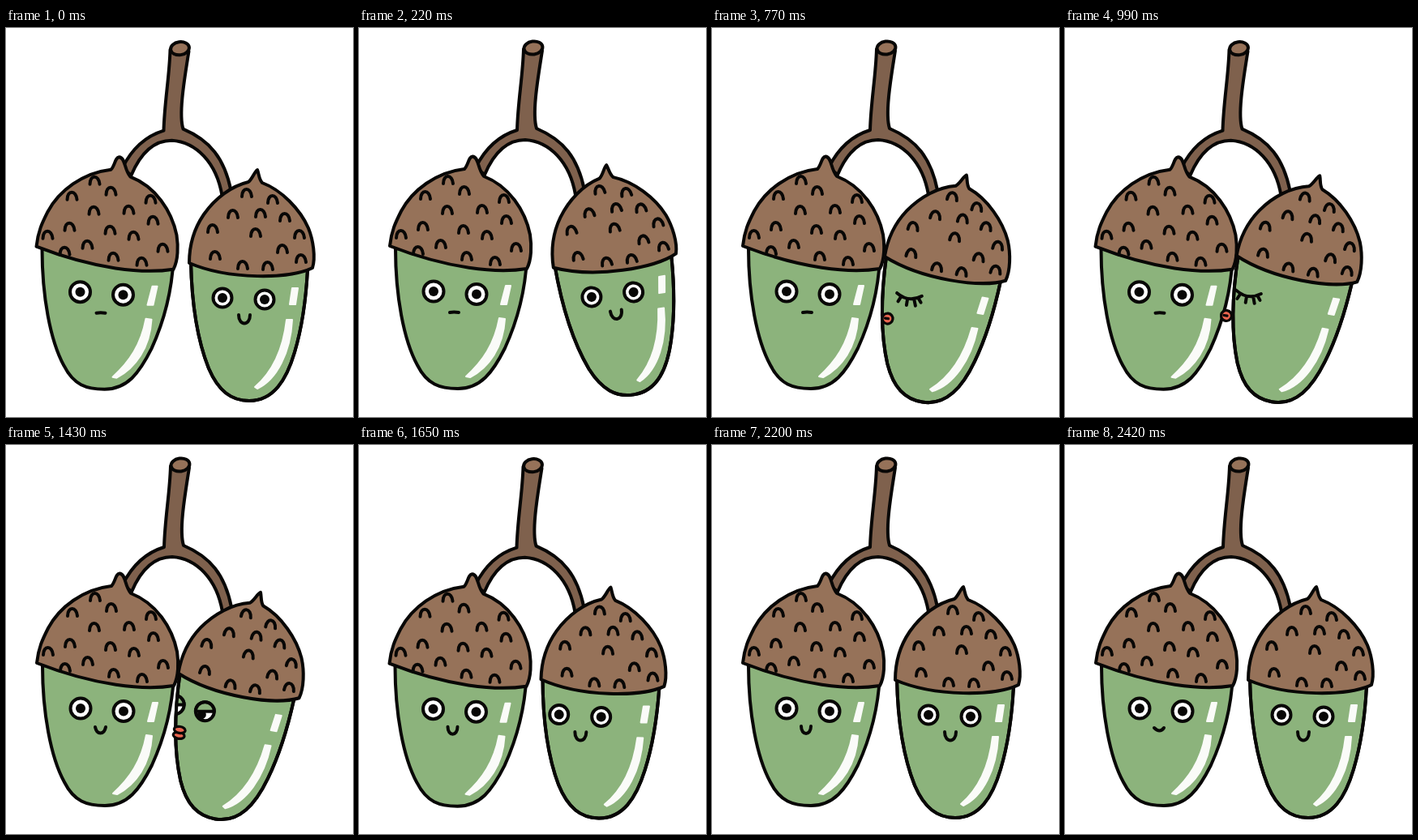
Write an HTML page that moves like this. It is 428x480 px and loops after 2530 ms.

```html
<!DOCTYPE html>
<html lang="en">
<head>
<meta charset="utf-8">
<title>Acorns</title>
<style>
  html, body { margin: 0; width: 100%; height: 100%; overflow: hidden; background: #fff; }
  svg { display: block; width: 100%; height: 100%; }
  .ink { stroke: #080706; stroke-width: 4; stroke-linecap: round; stroke-linejoin: round; }
  .line { fill: none; }
  .cap { fill: #967259; }
  .body { fill: #8cb37c; }
  .branch { fill: #7f614d; }
  .shine { fill: #fafbf8; stroke: #fafbf8; stroke-width: 2; stroke-linejoin: round; }
  .lips { fill: #e9654f; stroke-width: 3.2; }
</style>
</head>
<body>
<svg viewBox="0 0 428 480">
  <defs>
    <path id="rightBody" d="M228 288C229 340 236 385 250 420C262 448 278 460 300 460C330 460 346 434 356 400C365 370 370 335 372 298Z"/>
    <clipPath id="skin"><use href="#rightBody"/></clipPath>
  </defs>
  <g id="still">
    <path class="ink branch" d="M203 26C202 60 196 90 195 126C172 133 155 150 144 172L155 181C168 150 185 138 205 138C235 140 260 165 267 206L278 200C270 160 252 138 219 124C213 105 221 60 226 28"/>
    <ellipse class="ink cap" cx="215" cy="24.5" rx="11.5" ry="8" transform="rotate(-8 215 24.5)"/>
    <path class="ink body" d="M45 272C45 330 55 385 72 416C84 440 100 445 122 445C150 445 165 425 180 395C195 362 205 325 207 285Z"/>
    <path class="shine" d="M181 318L187 318L182 341L175 341ZM173 358L180 359C178 394 160 419 137 431L132 430C153 411 167 390 173 358Z"/>
    <path class="ink cap" d="M38 269C40 250 45 240 52 226C66 200 95 178 130 174C135 169 135 159 140 158.500C148 159 146 174 154 183C185 195 205 225 211 255C213 268 213 286 207 297C170 303 110 297 38 269Z"/>
    <g id="leftScales"></g>
    <g id="leftFace"></g>
  </g>
  <g id="swing">
    <use href="#rightBody" class="ink body"/>
    <path class="shine" d="M353 321L360 321L357 341L350 341ZM346 360L353 360C351 400 334 434 310 445L307 443C329 424 342 395 346 360Z"/>
    <g id="rightFace" clip-path="url(#skin)"></g>
    <use href="#rightBody" class="ink line"/>
    <g id="rightMouth"></g>
    <path class="ink cap" d="M226 290C226 265 233 246 244 230C258 210 278 195 299 190C304 186 306 178 310 175C312 180 312 187 316 191C340 200 363 224 373 247C379 262 382 283 378 296C350 310 275 311 226 290Z"/>
    <g id="rightScales"></g>
  </g>
</svg>
<script>
const STEP = 110, COUNT = 23;
const el = id => document.getElementById(id);
const line = (d, x = 0, y = 0) =>
  `<path class="ink line" d="${d}" transform="translate(${x} ${y})"/>`;

const scales = points => points.map(([x, y]) => line("M-6 5C-6 -7 5 -7 6 5", x, y)).join("");
el("leftScales").innerHTML = scales([
  [110, 187], [82, 206], [130, 200], [179, 210], [109, 224], [152, 223], [79, 244], [182, 236],
  [129, 248], [52, 254], [158, 255], [101, 266], [73, 274], [194, 270], [133, 281], [168, 287]]);
el("rightScales").innerHTML = scales([
  [297, 203], [329, 211], [280, 229], [314, 228], [344, 233], [255, 247], [308, 252],
  [362, 254], [341, 272], [258, 280], [292, 292], [323, 293], [364, 284]]);

const openEye = (x, y, r) =>
  `<circle class="ink" cx="${x}" cy="${y}" r="${r}" fill="#fff"/><circle cx="${x}" cy="${y}" r="6" fill="#080706"/>`;
const lidEye = (x, y) => `<g transform="translate(${x} ${y}) rotate(-9)">
  <circle class="ink" r="11.5" fill="#fff"/><circle cx="-4" cy="4" r="5.500" fill="#080706"/>
  <path class="ink body" d="M-11.500 0A11.500 11.500 0 0 1 11.500 0Z"/></g>`;
const shutEye = (x, y) =>
  line("M-16 -3Q0 7 15 -4M-10 0l-3 7M-2 2v8M6 1l3 8M11 -1l4 5", x, y);
const lips = (x, y, w) => `<g class="ink lips" transform="translate(${x} ${y})">
  <ellipse cy="3.500" rx="${w}" ry="4"/><ellipse cy="-3.500" rx="${w}" ry="4"/></g>`;
const kiss = (x, y) => `<g class="ink lips" transform="translate(${x} ${y})">
  <circle r="6.500"/><path d="M-3 0h4"/></g>`;

const leftMouths = {
  flat: "M112 351Q117 350 123 351",
  smile: "M110 348C112 358 121 358 123 348",
  grin: "M110 347C110 359 122 359 122 347",
  faint: "M110 349Q117 356 122 349"
};
const leftMood = i => i < 12 ? "flat" : i < 15 ? "smile" : i < 21 ? "grin" : "faint";
const rightMood = i => i < 5 || i > 14 ? "smile" : i < 7 ? "pout" : i < 12 ? "kiss" : "glance";

// Swing angle in degrees and sideways turn of the face, one value per step
const angles = [0, -3, -8.8, -14.5, -9, -0.8, 5, 9, 10, 10, 10, 10, 9.700, 9.300, 6, 1, -5, -2.500];
const turns = [0, 0, 0, 0, -4, -9, -30, -55, -70, -70, -70, -70, -62, -53, -40, -18];

function drawRight(i) {
  const mood = rightMood(i), turn = turns[i] || 0;
  const x = 319 + turn, mouthX = 294 + turn;
  const gap = mood === "glance" ? 38 : 52;
  const eye = { kiss: shutEye, glance: lidEye }[mood] || ((x, y) => openEye(x, y, 11.5));
  const eyeY = mood === "glance" ? 330 : 334;
  el("rightFace").innerHTML = eye(x - gap, eyeY - 1) + eye(x, eyeY + 1);
  el("rightMouth").innerHTML =
    mood === "smile" ? line("M-7 -5C-7 9 7 9 7 -5", mouthX, 359) :
    mood === "kiss" ? kiss(mouthX + 2.5, 365) :
    mood === "pout" ? lips(mouthX - 1, 365, 5.5) : lips(mouthX - 2, 362, 7);
  el("swing").setAttribute("transform", `rotate(${angles[i] || 0} 270 203)`);
}

function draw(i) {
  el("leftFace").innerHTML =
    openEye(92, 325, 12.5) + openEye(145, 328.5, 12.5) + line(leftMouths[leftMood(i)]);
  el("still").setAttribute("transform", i % 3 ? "" : "translate(-.5 .7)");
  drawRight(i);
}

let shown = -1;
function tick() {
  const i = Math.floor(performance.now() / STEP) % COUNT;
  if (i !== shown) draw(shown = i);
  requestAnimationFrame(tick);
}
tick();
</script>
</body>
</html>
```
